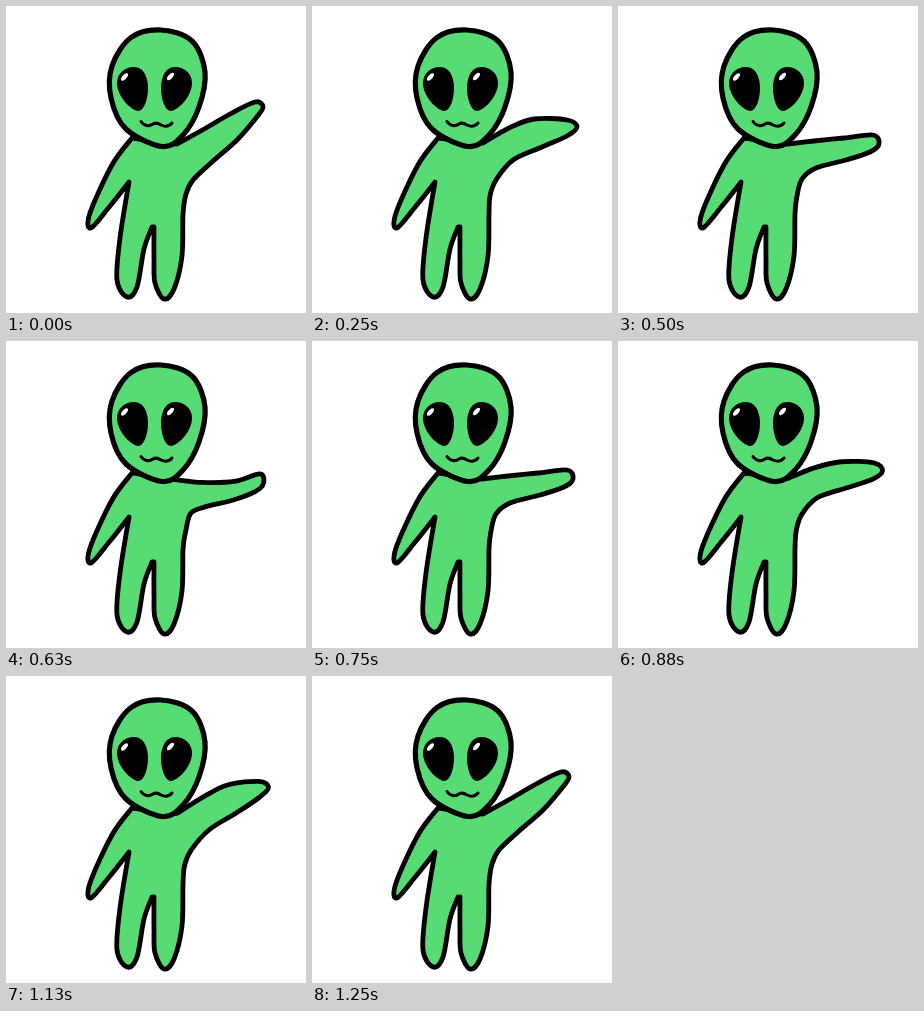
An HTML page with a canvas that plays this animation: 300 px wide and 307 px high, repeating every 1.37 s.

```html
<!DOCTYPE html>
<html lang="en">
<head>
<meta charset="utf-8">
<title>Waving alien</title>
<style>
  html, body { margin: 0; width: 100%; height: 100%; overflow: hidden; background: #fff; }
  canvas { display: block; }
</style>
</head>
<body>
<canvas id="stage" width="300" height="307"></canvas>
<script>
const ctx = document.getElementById('stage').getContext('2d');
const GREEN = '#57dc75';
const LOOP = 1370, TICK = 10, HOLD = 125;
const TURN = 5;       // steps from the highest to the lowest pose
const LOWEST = 4.6;   // the swing slows before it turns back

const pts = text => text.split(' ').map(p => p.split(',').map(Number));

const head = pts('155,24 125,31.5 106,60 105,92 120,123 156,140.5 177,129 193,101 199,66 186,35');
const leftArm = pts('126,132 106,159 84,207 85,222 104,200 123,176');
const leftLeg = pts('123,176 114,232 111,274 121,291 131,281 138,243 146,221');
const rightLeg = pts('148,221 148,254 149,277 158,293 168,283 176,250');

// waving arm from the hip, around the hand, back to the neck
const high = pts('177,208 180,188 187,174 206,156 231,134 250,112 257,101 249,96 224,108 200,122 171,138');
const mid = pts('177,208 178,190 184,174 201,154 230,141 255,130 265,121 255,114 222,113 197,122 171,137');
const low = pts('177,208 179,190 184,173 198,162 228,154 252,146 261,138 255,129 226,132 196,135 170,138');

// every point swings on a parabola through its places at u = 0, 2 and 4
function armAt(u) {
  const a = (u - 2) * (u - 4) / 8, b = u * (4 - u) / 4, c = u * (u - 2) / 8;
  return high.map((p, i) => p.map((v, j) => a * v + b * mid[i][j] + c * low[i][j]));
}

// Catmull-Rom curve through the points
function curve(path, p, closed) {
  const n = p.length;
  const at = i => closed ? p[(i + n) % n] : p[Math.max(0, Math.min(n - 1, i))];
  path.lineTo(...p[0]);
  for (let i = 0; i < (closed ? n : n - 1); i++) {
    const [a, b, c, d] = [at(i - 1), at(i), at(i + 1), at(i + 2)];
    path.bezierCurveTo(
      b[0] + (c[0] - a[0]) / 6, b[1] + (c[1] - a[1]) / 6,
      c[0] - (d[0] - b[0]) / 6, c[1] - (d[1] - b[1]) / 6,
      c[0], c[1]);
  }
}

function bodyPath(u) {
  const path = new Path2D();
  curve(path, leftArm);
  curve(path, leftLeg);
  curve(path, rightLeg.concat(armAt(u)));
  path.closePath();
  return path;
}

const headPath = new Path2D();
curve(headPath, head, true);
headPath.closePath();

const eye = new Path2D('M128 61C138 61 142 72 142 82C142 93 138 105 132 105C126 105 111 91 111 77C111 68 118 61 128 61Z');
const mouth = new Path2D('M135 115.5C138 120 143 121 147 118C150 116 152 117 155 119C159 121 163 120.5 166 117');

function shape(path, width) {
  ctx.fillStyle = GREEN;
  ctx.fill(path);
  ctx.lineWidth = width;
  ctx.stroke(path);
}

function glint(x, y) {
  ctx.beginPath();
  ctx.ellipse(x, y, 4.6, 2.1, -0.85, 0, Math.PI * 2);
  ctx.fill();
}

function drawEyes() {
  ctx.fillStyle = '#000';
  ctx.fill(eye);
  ctx.save();
  ctx.translate(297, 0);
  ctx.scale(-1, 1);
  ctx.fill(eye);
  ctx.restore();
  ctx.fillStyle = '#fff';
  glint(118.5, 71);
  glint(164.5, 70.5);
}

function draw(u) {
  ctx.fillStyle = '#fff';
  ctx.fillRect(0, 0, 300, 307);
  ctx.strokeStyle = '#000';
  ctx.lineCap = ctx.lineJoin = 'round';
  shape(bodyPath(u), 4.8);
  shape(headPath, 5.2);
  drawEyes();
  ctx.lineWidth = 3;
  ctx.stroke(mouth);
}

function frame() {
  const t = performance.now() % LOOP;
  const step = Math.floor(Math.floor(t / TICK) * TICK / HOLD);
  draw(Math.min(TURN - Math.abs(TURN - step), LOWEST));
  requestAnimationFrame(frame);
}
frame();
</script>
</body>
</html>
```
